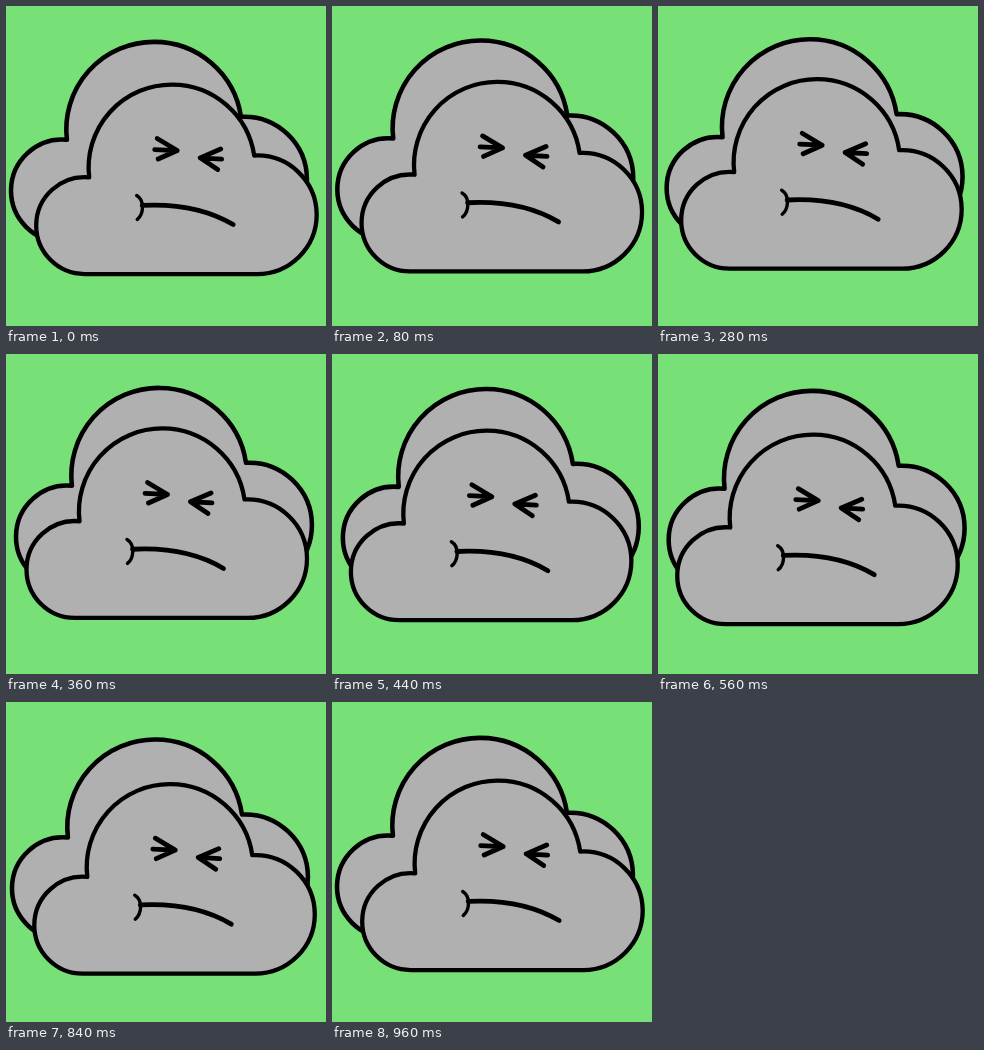
An HTML page that plays this animation: 320 by 320 pixels, repeating every 1000 ms.

```html
<!DOCTYPE html>
<html lang="en">
<head>
<meta charset="utf-8">
<title>Grumpy clouds</title>
<style>
  html, body { margin: 0; height: 100%; overflow: hidden; background: #77e077; }
  svg { display: block; width: 100%; height: 100%; }
</style>
</head>
<body>
<svg viewBox="0 0 320 320" fill="none" stroke="#000" stroke-width="4.3" stroke-linecap="round" stroke-linejoin="round">
  <defs>
    <path id="cloud" fill="#b0b0b0" d="M78.5 268.5A48.5 48.5 0 0 1 30 220A48.5 48.5 0 0 1 83 171.8A83 83 0 0 1 166 79A83 83 0 0 1 248 150A59.5 59.5 0 0 1 310.5 209.3A59.5 59.5 0 0 1 251 268.5Z"/>
  </defs>
  <g id="back">
    <use href="#cloud" transform="translate(-23.65 -47.6) scale(1.055)"/>
  </g>
  <g id="front">
    <g transform="translate(-5.6 -.7)">
      <use href="#cloud"/>
      <g stroke-width="4.8">
        <path d="M151 133L171 145L152 153.5M148.5 144L171 145"/>
        <path d="M214.5 143.5L194 152.3L211.5 164M215.5 153.5L194 152.3"/>
        <path d="M136 199.8Q190 197 227 219"/>
        <path stroke-width="3.4" d="M130.5 190Q136.5 193.5 136.3 202Q136 210 131 214"/>
      </g>
    </g>
  </g>
</svg>
<script>
const STEP = 40, STEPS = 24, LAG = 0.05;
const [back, front] = ["back", "front"].map(id => document.getElementById(id));

function orbit(el, angle, rx, ry) {
  const x = rx * Math.cos(angle), y = -ry * Math.sin(angle);
  el.setAttribute("transform", `translate(${x.toFixed(2)} ${y.toFixed(2)})`);
}

function draw(now) {
  // One full turn takes 24 steps; the closing pose is held for one more.
  const n = Math.floor(now / STEP) % (STEPS + 1);
  const angle = 2 * Math.PI * n / STEPS - LAG;
  orbit(front, angle, 5.8, 5.2);
  orbit(back, angle, -3, 2.5);
  requestAnimationFrame(draw);
}
requestAnimationFrame(draw);
</script>
</body>
</html>
```
